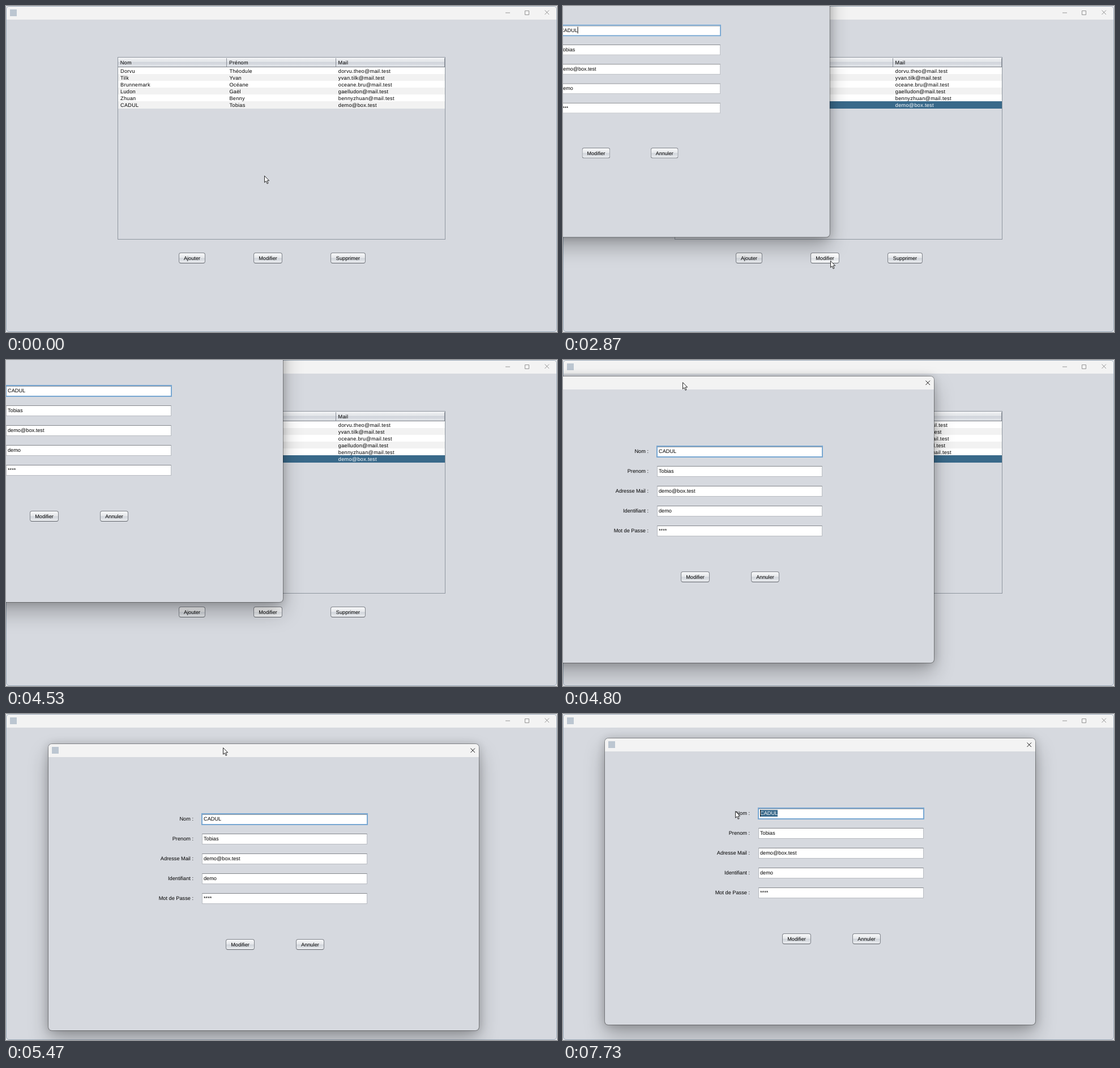
Recreate the animation shown at these times as an HTML page. Size 973 by 575 pixels, loop 8000 ms.

```html
<!DOCTYPE html>
<html lang="fr">
<head>
<meta charset="utf-8">
<style>
html, body { margin: 0; width: 100%; height: 100%; overflow: hidden; background: #e4e6ea; }
body { font: 9.2px/12px "Liberation Sans", Arial, sans-serif; text-rendering: geometricPrecision; color: #000; }
div, svg { position: absolute; box-sizing: border-box; white-space: pre; left: 0; top: 0; }
#stage { width: 973px; height: 575px; overflow: hidden; }
#main { inset: 0; background: #d6d9df; border: 1px solid #9aa9b8; border-radius: 6px; overflow: hidden; }
.bar { width: 100%; height: 23px; background: #f3f3f3; }
.logo { width: 12px; height: 12px; background: #bcc6d1; }
.wide { letter-spacing: .27px; }
.head { background: linear-gradient(#f3f4f6, #e0e3e7 48%, #cfd3da 52%, #e3e6ea); border-bottom: 1px solid #777c84; }
.btn { height: 19px; border: 1px solid #80848b; border-bottom-color: #5f636a; border-radius: 4px; text-align: center;
  line-height: 18px; background: linear-gradient(#f7f8f9, #e6e8eb 45%, #d1d5db 55%, #ebedf0); }
.btn.hover { background: linear-gradient(#fff, #f3f4f6 45%, #e2e5e9 55%, #f9fafb); }
.field { width: 292px; height: 19px; background: #fff; border: 1px solid #b9bcc2; border-top-color: #85888d; }
.focus { width: 294px; height: 21px; border: 2px solid #78a7d2; box-shadow: inset 0 1px #9b9ea3; }
.label { width: 256px; text-align: right; }
#dialog { width: 760px; height: 505px; background: #d6d9df; border-radius: 6px;
  box-shadow: 0 0 0 1px rgba(0,0,0,.32), 0 1px 16px rgba(0,0,0,.2), 0 18px 36px rgba(0,0,0,.27); }
#dialog .bar { border-radius: 6px 6px 0 0; }
.picked { background: #39698a; color: #fff; }
svg { overflow: visible; fill: none; }
</style>
</head>
<body>
<div id="stage">
  <div id="main"></div>
  <div id="dialog"></div>
  <svg id="arrow" width="10" height="15"><path d="M.5.6v11.6l2.6-2.5 2 4.6 1.9-.8-2-4.5h3.7z" fill="#fff" stroke="#111" stroke-width=".9"/></svg>
  <svg id="beam" width="8" height="16"><path d="M-3-8h2.5l.5.5.5-.5H3M0-7.5v15M-3 8h2.5l.5-.5.5.5H3" stroke="#111"/></svg>
</div>
<script>
const $ = id => document.getElementById(id);
const main = $('main'), dialog = $('dialog'), arrow = $('arrow'), beam = $('beam');

function add(parent, cls, x, y, style = '', text = '') {
  const el = document.createElement('div');
  el.className = cls;
  el.style.cssText = `left:${x}px;top:${y}px;${style}`;
  el.textContent = text;
  parent.append(el);
  return el;
}
const box = (parent, x, y, w, h, color) => add(parent, '', x, y, `width:${w}px;height:${h}px;background:${color}`);
const label = (parent, x, y, text, cls = '') => add(parent, cls, x, y - 6, '', text);
const button = (parent, x, y, w, text) => add(parent, 'btn', x, y, `width:${w}px`, text);
function icon(parent, x, y, path) {
  parent.insertAdjacentHTML('beforeend',
    `<svg style="left:${x}px;top:${y}px" width="9" height="9"><path d="${path}" stroke="currentColor" stroke-width=".9"/></svg>`);
}
const cross = 'M.5.5l7.5 7.5M8 .5L.5 8';

// Main window, with slivers of the desktop along its edges
const page = add(main, '', -1, -1, 'width:973px;height:575px');
add(page, 'bar', 0, 0, 'height:24px');
box(page, 0, 0, 973, 1, '#b4bcc5');
for (let i = 0; i < 3; i++) box(page, 70 + i * 334, 0, 152, 1, '#23283c');
for (let i = 0; i < 6; i++) box(page, 0, 87 + (i % 3) * 5 + (i > 2) * 90, 1, 3, '#4c5866');
for (let x = 2; x < 134; x += 6) box(page, x, 574, 3, 1, '#535d68');
box(page, 972, 500, 1, 9, '#b99a4e');
add(page, 'logo', 7, 6);
const controls = add(page, '', 0, 0);
icon(controls, 882, 7, 'M0 5h8');
icon(controls, 916, 7, 'M.5 1.5h7v7h-7z');
icon(controls, 950.5, 7, cross);

// Table
const column = i => 202 + i * 192.4;
add(page, '', 197, 90, 'width:579px;height:322px;border:1px solid #8f969f');
add(page, 'head', 198, 91, 'width:577px;height:17px');
['Nom', 'Prénom', 'Mail'].forEach((s, i) => {
  label(page, column(i) - .3, 99.5, s, 'wide');
  box(page, Math.round(column(i + 1) - 5), 92, 1, 15, '#8b9099');
});
const rows = [
  ['Dorvu', 'Théodule', 'dorvu.theo@mail.test'],
  ['Tilk', 'Yvan', 'yvan.tilk@mail.test'],
  ['Brunnemark', 'Océane', 'oceane.bru@mail.test'],
  ['Ludon', 'Gaël', 'gaelludon@mail.test'],
  ['Zhuan', 'Benny', 'bennyzhuan@mail.test'],
  ['CADUL', 'Tobias', 'demo@box.test']
];
let lastRow, lastCell;
rows.forEach((row, i) => {
  lastRow = add(page, 'wide', 198, 108 + i * 12, `width:577px;height:13px;background:${i % 2 ? '#f2f2f2' : '#fff'}`);
  lastCell = add(lastRow, '', 0, 0, 'width:192px;height:13px');
  row.forEach((s, c) => label(lastRow, column(c) - 198, 6.5 + i * .1, s));
});
button(page, 305, 435, 47, 'Ajouter');
const edit = button(page, 437, 435, 51, 'Modifier');
button(page, 573, 435, 62, 'Supprimer');

// Dialog
add(dialog, 'bar', 0, 0);
add(dialog, 'logo', 6, 5);
icon(dialog, 744.8, 6.7, cross);
const form = [['Nom :', 'CADUL'], ['Prenom :', 'Tobias'], ['Adresse Mail :', 'demo@box.test'],
  ['Identifiant :', 'demo'], ['Mot de Passe :', '****']];
form.forEach(([name, value], i) => {
  const y = 132.3 + i * 34.9;
  label(dialog, 0, y, name, 'label');
  if (i) add(dialog, 'field', 271, Math.round(y) - 9);
  else add(dialog, 'field focus', 270, 122);
  label(dialog, 274, y, value);
});
const picked = label(dialog, 274, 132.3, form[0][1], 'picked');
const caret = box(dialog, 305, 126, 1, 12, '#000');
button(dialog, 313, 344, 51, 'Modifier');
button(dialog, 437, 344, 50, 'Annuler');

// Turning points of the mouse: [time, x, y]
const path = [
  [67, 456, 299], [1070, 353, 175],
  [1400, 353, 175], [1867, 467, 357], [2100, 478, 425], [2333, 472, 449],
  [2867, 472, 449], [3467, 149, 147], [4000, 27, -86],
  [4460, 27, -86], [4533, 43, -67], [4800, 211, 38.6], [5130, 392, 65], [5467, 383, 58.7], [5600, 382, 49],
  [5733, 382, 49], [6067, 404, 110], [6600, 382, 175], [6870, 296, 173], [7000, 304, 171]
];

// Smooth curve through the points that never overshoots at a turn
function mouse(t) {
  const last = path.length - 1;
  t = Math.min(Math.max(t, path[0][0]), path[last][0]);
  const i = Math.max(0, path.findIndex(k => k[0] >= t) - 1);
  const a = path[i], b = path[i + 1], h = b[0] - a[0], u = (t - a[0]) / h, v = 1 - u;
  return [1, 2].map(d => {
    const tangent = j => {
      if (j < 1 || j >= last) return 0;
      const [p, k, n] = [path[j - 1], path[j], path[j + 1]];
      return (k[d] - p[d]) * (n[d] - k[d]) > 0 ? (n[d] - p[d]) / (n[0] - p[0]) : 0;
    };
    return a[d] * v * v * (1 + 2 * u) + b[d] * u * u * (3 - 2 * u)
      + h * u * v * (tangent(i) * v - tangent(i + 1) * u);
  }).map(Math.round);
}

const show = (el, on) => el.style.visibility = on ? 'visible' : 'hidden';
const move = (el, x, y, more = '') => el.style.transform = `translate(${x}px,${y}px)${more}`;
const STEP = 200 / 3, GRIP = [308, 6], LAG = 14;

function draw(now) {
  // The screen refreshes 15 times per second.
  const t = Math.floor((now % 8000 + 4) / STEP) * STEP;
  const [mx, my] = mouse(t);

  const chosen = t > 1260;
  controls.style.color = chosen && t < 2660 ? '#111' : '#8b8b8b';
  lastRow.style.background = chosen ? '#39698a' : '#f2f2f2';
  lastRow.style.color = chosen ? '#fff' : '#000';
  lastCell.style.border = chosen ? '1px solid #6f9fc4' : 'none';
  edit.classList.toggle('hover', t > 2190);

  // The dialog pops up, then trails the mouse while it is dragged.
  const [hx, hy] = mouse(Math.min(Math.max(t - LAG, 4460), 5600));
  const dx = hx - GRIP[0], dy = hy - GRIP[1];
  const open = Math.min(1, Math.max(0, (t - 2600) / 400));
  dialog.style.display = t > 2660 ? '' : 'none';
  dialog.style.opacity = Math.min(1, (t - 2600) / 150);
  move(dialog, dx, dy, open < 1 ? ` scale(${1 - .1 * (1 - open) ** 1.4})` : '');

  const selecting = t > 6660;
  const from = Math.min(31, Math.max(0, mx - dx - 274));
  show(picked, selecting);
  picked.style.clipPath = `inset(0 0 0 ${from}px)`;
  caret.style.left = (selecting ? 274 + from : 305) + 'px';
  const phase = t < 6600 ? t - 2830 : t - 5700;
  show(caret, t > 2800 && phase % 1000 < 500);

  const overText = t > 6390 && t < 6990;
  show(beam, overText);
  show(arrow, !overText);
  move(overText ? beam : arrow, mx, my);
}

const start = performance.now();
(function frame() {
  draw(performance.now() - start);
  requestAnimationFrame(frame);
})();
</script>
</body>
</html>
```
